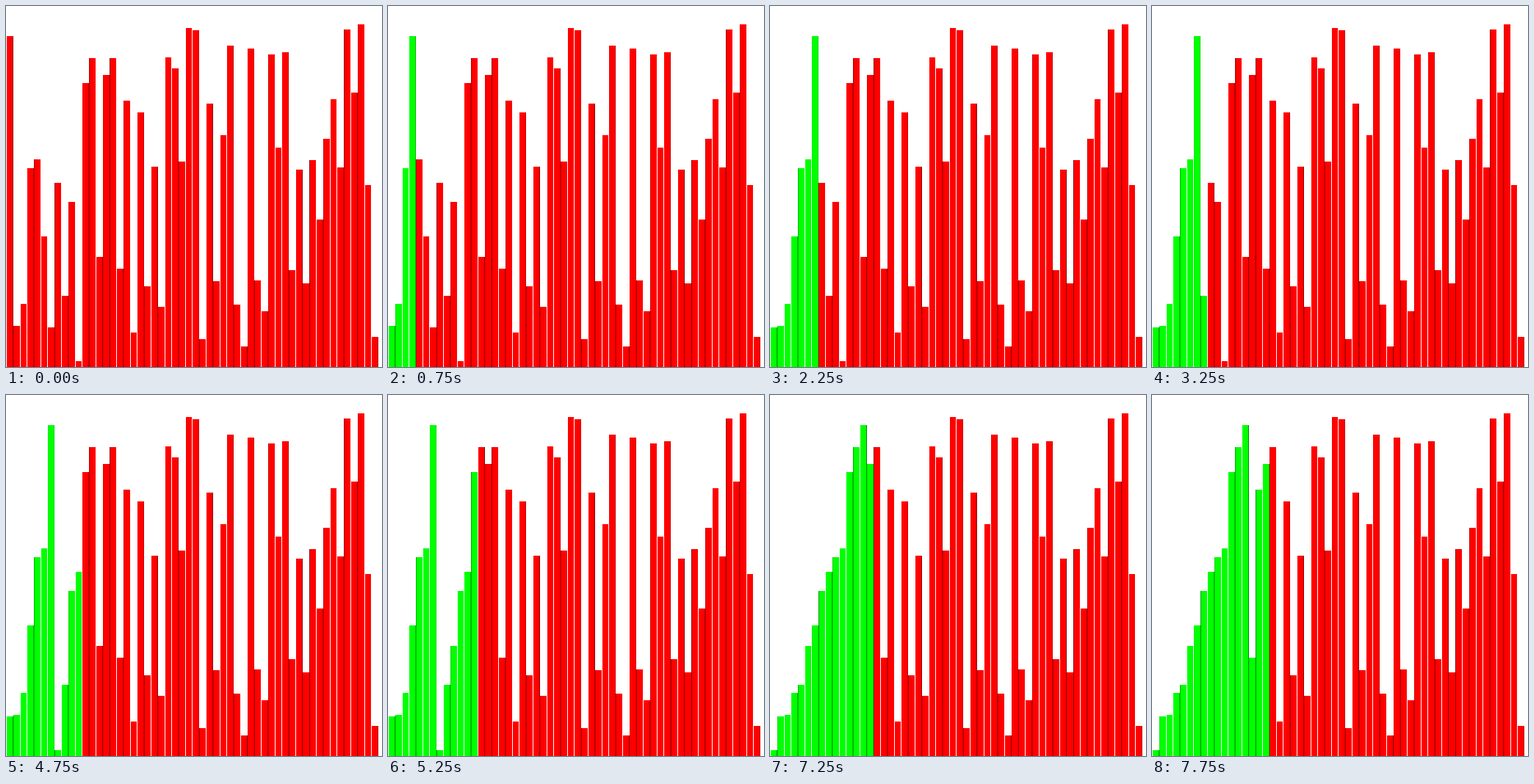
An HTML page with a canvas for the animation above (8000 ms loop, 512 by 492 pixels).

```html
<!DOCTYPE html>
<html lang="en">
<head>
<meta charset="utf-8">
<title>Merge sort</title>
<style>
  html, body { margin: 0; width: 100%; height: 100%; overflow: hidden; background: #fff; }
  canvas { display: block; }
</style>
</head>
<body>
<canvas id="stage" width="512" height="492"></canvas>
<script>
const LOOP = 8000, FLOOR = 492;
const LEFT = 0.76, PITCH = 9.38, WIDTH = 8.82;
const STEP = 250, PAUSE = 1000;
const ctx = document.getElementById('stage').getContext('2d');

// The unsorted values.
const heights = [
  451, 56, 86, 271, 283, 178, 54, 251, 97, 225, 8, 387, 421, 150, 398, 421, 134, 363,
  47, 347, 110, 273, 82, 422, 407, 280, 462, 459, 38, 359, 117, 316, 438, 85, 28, 434,
  118, 76, 426, 299, 429, 132, 269, 114, 282, 201, 311, 365, 272, 460, 374, 467, 248, 41
];

// Every merge makes one state; merges of more than three bars rest longer.
function record(values) {
  const bars = values.slice();
  const states = [{ time: 0, bars: values, green: 0 }];
  let time = STEP;

  function sort(from, to) {
    if (to - from < 2) return;
    const mid = Math.ceil((from + to) / 2);
    sort(from, mid);
    sort(mid, to);
    const merged = bars.slice(from, to).sort((a, b) => a - b);
    bars.splice(from, to - from, ...merged);
    states.push({ time, bars: bars.slice(), green: states.length + 1 });
    time += to - from > 3 ? PAUSE : STEP;
  }

  sort(0, bars.length);
  return states;
}

// Side columns covered by less than half stay empty, the others darken.
function drawBar(i, height, isGreen) {
  const start = LEFT + i * PITCH, end = start + WIDTH;
  for (let x = Math.round(start); x < Math.round(end); x++) {
    const cover = Math.min(x + 1, end) - Math.max(x, start);
    const level = Math.round(255 * cover);
    ctx.fillStyle = isGreen ? `rgb(0, ${level}, 0)` : `rgb(${level}, 0, 0)`;
    ctx.fillRect(x, FLOOR - height, 1, height);
  }
}

const states = record(heights);

function draw(time) {
  const { bars, green } = states.filter(state => state.time <= time).pop();
  ctx.fillStyle = '#fff';
  ctx.fillRect(0, 0, 512, FLOOR);
  bars.forEach((height, i) => drawBar(i, height, i < green));
}

const begin = performance.now();
function tick() {
  draw((performance.now() - begin) % LOOP);
  requestAnimationFrame(tick);
}
tick();
</script>
</body>
</html>
```
